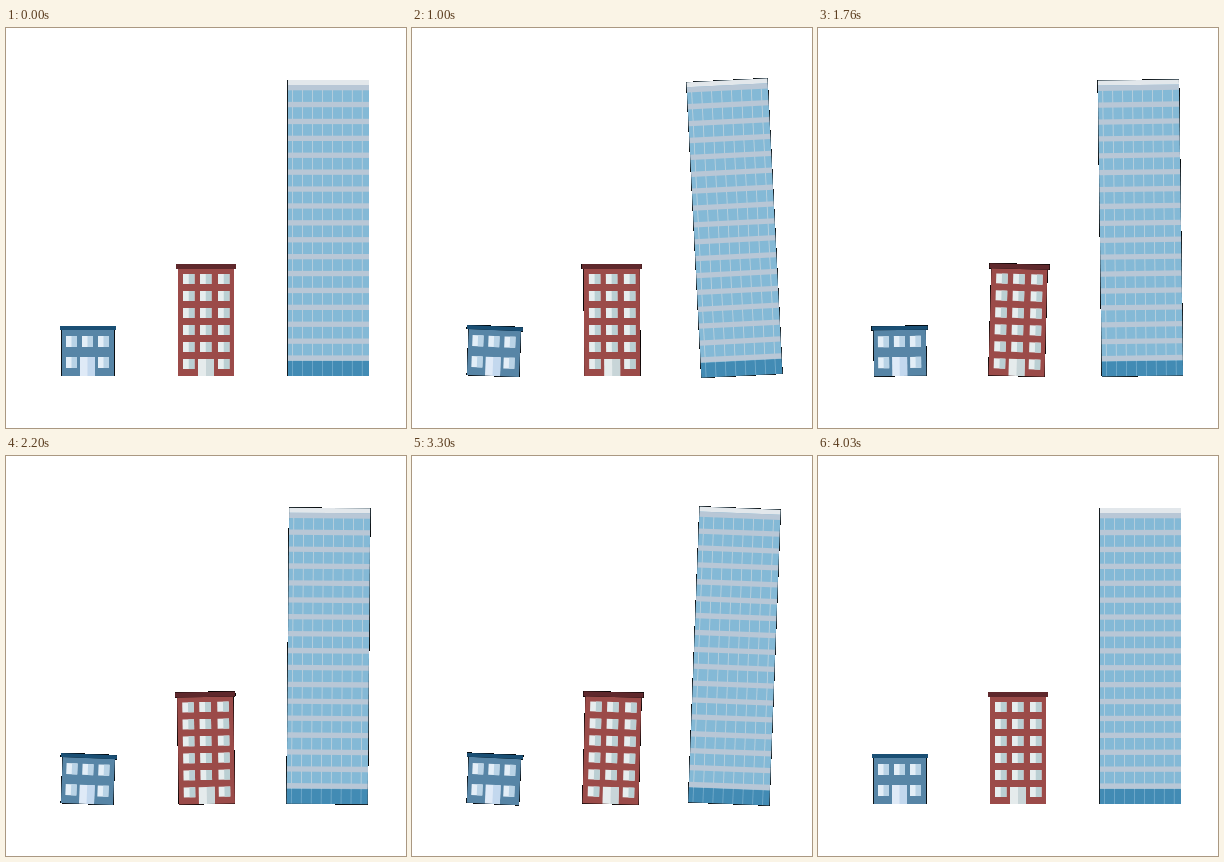
Recreate the animation shown at these times as an HTML page with a canvas. Size 400 by 400 pixels, loop 4.06 s.

```html
<!DOCTYPE html>
<html lang="en">
<head>
<meta charset="utf-8">
<title>Swaying buildings</title>
<style>
  html, body { margin: 0; width: 100%; height: 100%; overflow: hidden; background: #fff; }
  canvas { display: block; width: 400px; height: 400px; }
</style>
</head>
<body>
<canvas id="stage" width="400" height="400"></canvas>
<script>
const ctx = document.getElementById('stage').getContext('2d', { willReadFrequently: true });
const LOOP = 4060;
const LAST_STEP = 120;
const MAX_TILT = 3;
const EDGE_ALPHA = 14;

function rect(color, left, top, right, bottom) {
  ctx.fillStyle = color;
  ctx.fillRect(left, top, right - left, bottom - top);
}

// Details keep the silhouette's edge coverage unchanged.
function detail(...args) {
  ctx.globalCompositeOperation = 'source-atop';
  rect(...args);
  ctx.globalCompositeOperation = 'source-over';
}

function pane(light, dark, left, top, right, bottom) {
  detail(light, left, top, right, bottom);
  detail(dark, (left + right) / 2, top, right, bottom);
}

function drawHouse() {
  rect('#5785a6', 55.85, 302, 108.1, 348);
  rect('#1a4f74', 54, 298, 110, 302);
  for (const x of [60, 76, 92]) {
    for (const y of [308, 329]) {
      if (x !== 76 || y === 308) pane('#e3eef7', '#b9d3e6', x, y, x + 11, y + 11);
    }
  }
  pane('#dfeaf7', '#c3d8ee', 74, 329, 89, 348);
}

function drawApartments() {
  rect('#9b4b49', 172, 241, 228, 348);
  rect('#5f282c', 170, 236, 230, 241);
  for (const x of [177, 194, 212]) {
    for (let row = 0; row < 6; row++) {
      const y = 246 + row * 17;
      if (x !== 194 || row < 5) pane('#e6edee', '#bacfd3', x, y, x + 11.5, y + 10);
    }
  }
  pane('#e5ebec', '#c8d5d8', 192, 331, 208, 348);
}

function drawTower() {
  const left = 281.85, right = 363, pitch = 16.9;
  rect('#84b9d6', left, 52, right, 348);
  detail('#e2e7eb', left, 52, right, 57);
  detail('#428bb4', left, 333, right, 348);
  for (let i = 0; i < 8; i++) {
    const x = 286.6 + i * 9.95;
    detail('rgba(205, 216, 224, .8)', x - .4, 62, x + .4, 333);
    detail('rgba(150, 194, 218, .6)', x - .4, 333, x + .4, 348);
  }
  for (let i = 0; i <= 16; i++) {
    const y = 57 + i * pitch;
    detail('#b8c7d6', left, y, right, y + 5.3);
  }
}

const buildings = [
  { draw: drawHouse, x: 82, y: 323, period: 36, end: 108 },
  { draw: drawApartments, x: 200, y: 292, period: 60, end: 120 },
  { draw: drawTower, x: 322.4, y: 200, period: 120, end: 120 }
];

// Linear sway: upright, left, right, upright.
function tilt(step, { period, end }) {
  if (step >= end) return 0;
  const phase = (step % period) / period;
  const wave = phase < .25 ? -4 * phase : phase < .75 ? 4 * phase - 2 : 4 - 4 * phase;
  return wave * MAX_TILT * Math.PI / 180;
}

// Partly covered edge pixels become opaque on a black matte.
function hardenEdges() {
  const image = ctx.getImageData(0, 0, 400, 400);
  const data = image.data;
  for (let i = 0; i < data.length; i += 4) {
    const alpha = data[i + 3];
    if (alpha === 0 || alpha === 255) continue;
    for (let c = 0; c < 3; c++) data[i + c] *= alpha / 255;
    data[i + 3] = alpha < EDGE_ALPHA ? 0 : 255;
  }
  ctx.putImageData(image, 0, 0);
}

function render(step) {
  ctx.clearRect(0, 0, 400, 400);
  for (const building of buildings) {
    ctx.save();
    ctx.translate(building.x, building.y);
    ctx.rotate(tilt(step, building));
    ctx.translate(-building.x, -building.y);
    building.draw();
    ctx.restore();
  }
  hardenEdges();
}

let shown = -1;
function tick() {
  const time = performance.now() % LOOP;
  const step = Math.min(LAST_STEP, Math.max(0, Math.floor((time + 7) * .03) - 1));
  if (step !== shown) render(shown = step);
  requestAnimationFrame(tick);
}
tick();
</script>
</body>
</html>
```
